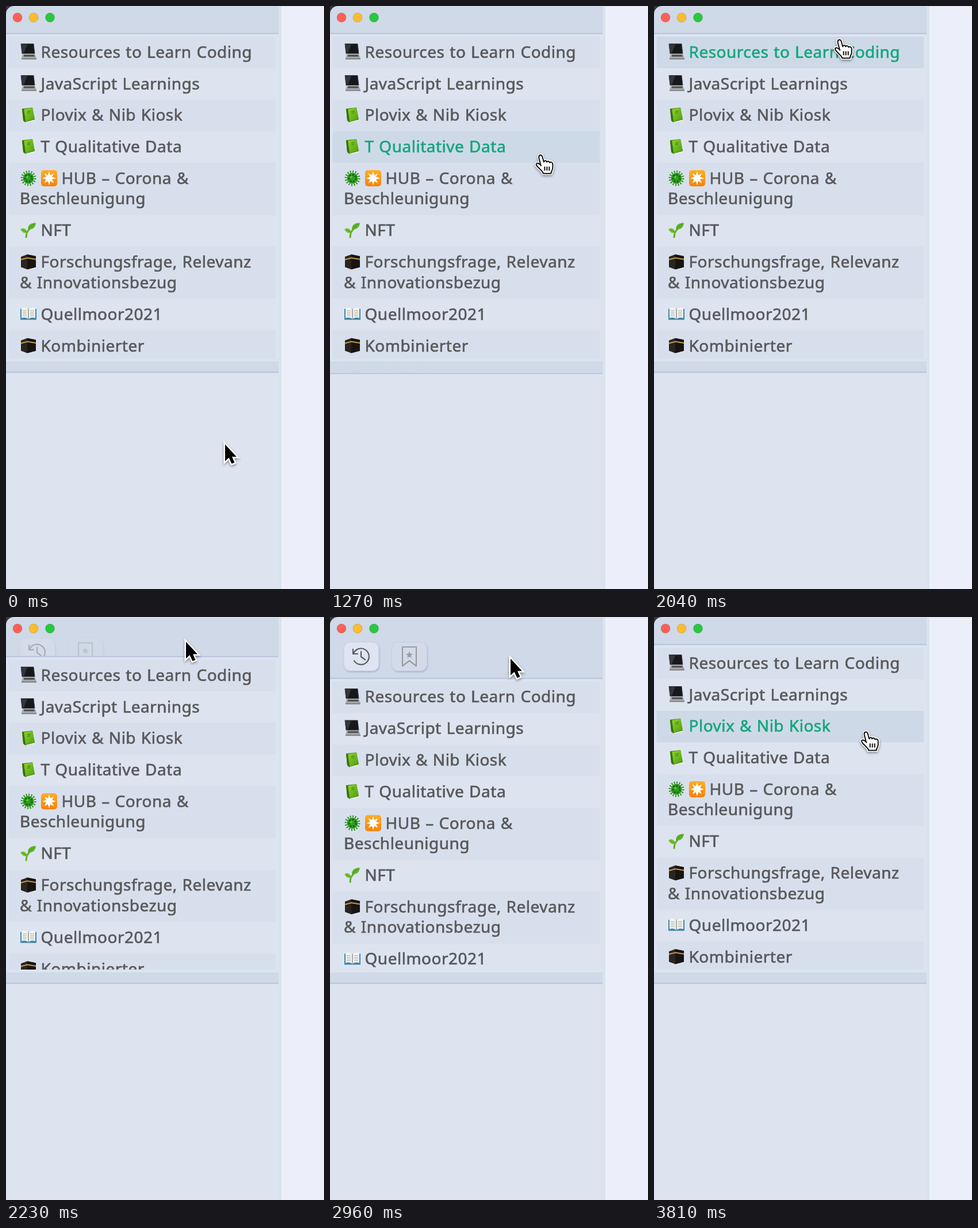
These frames come from a looping animation (553 px wide and 1012 px high, 3.85 s). An HTML page:

```html
<!DOCTYPE html>
<html lang="de">
<head>
<meta charset="utf-8">
<title>Sidebar</title>
<style>
  html, body { margin: 0; width: 100%; height: 100%; overflow: hidden; background: #dde4f0; }
  #stage { display: block; width: 100vw; height: 100vh; }
  text { font: 400 28px "Noto Sans", sans-serif; letter-spacing: .5px; word-spacing: 1px; fill: #59595b; stroke: #59595b; stroke-width: .7px; }
  .row rect { fill: transparent; }
  .row:nth-child(odd) rect { fill: #d8dfec; }
  .row.hover rect { fill: #ced9e7; }
  .row.hover text { fill: #15a67e; stroke: #15a67e; }
  .bar { fill: #cfd9e7; }
  .edge { fill: #bbc8e0; }
  .button { fill: #dee4f1; stroke: #c3cee5; filter: drop-shadow(1px 2px 1px #aab8d2); }
  .dim { fill: #d3dbe9; }
  .line { fill: none; stroke: #5d5d60; stroke-width: 2.2; stroke-linecap: round; stroke-linejoin: round; }
  .pale { stroke: #9a9ca3; }
  .light { stroke: #0002; }
  #cursor { filter: drop-shadow(0 2px 2px #0006); }
</style>
</head>
<body>
<svg id="stage" viewBox="0 0 553 1012" preserveAspectRatio="none">
  <defs>
    <clipPath id="listClip"><rect y="49" width="474" height="563"/></clipPath>
    <linearGradient id="orange" x2="0" y2="1"><stop stop-color="#ffad25"/><stop offset="1" stop-color="#f58208"/></linearGradient>
    <linearGradient id="green" x2="1" y2="1"><stop stop-color="#92d329"/><stop offset="1" stop-color="#4c9e14"/></linearGradient>

    <g id="laptop">
      <path d="M1 0H23L25 17H3Z" fill="#17181c" stroke="#45474b"/>
      <path d="M2 1H12L6 16H4Z" fill="#34363b"/>
      <path d="M4 18H25L28 25H2Z" fill="#a5a7a9"/>
      <path d="M6 19H24L25 22H6Z" fill="#4b4d50"/>
      <path d="M2 25H28V27H2Z" fill="#77797c"/>
    </g>
    <g id="book">
      <path d="M3 3L21 1L25 23L9 27L5 24Z" fill="#487d18"/>
      <path d="M9 26L25 22V24L10 27Z" fill="#f2f3e8"/>
      <path d="M6 4L21 1L25 21L9 25Z" fill="url(#green)"/>
      <path d="M3 3L6 4L9 25L5 23Z" fill="#34730d"/>
      <path d="M12 8L18 7M12 11L17 10" stroke="#4b9016" stroke-width="1.5"/>
    </g>
    <g id="microbe">
      <circle cx="14" cy="14" r="11.5" fill="none" stroke="#359527" stroke-width="4" stroke-dasharray="2 2.5"/>
      <circle cx="14" cy="14" r="9.5" fill="#2f9c22"/>
      <circle cx="14" cy="14" r="6" fill="none" stroke="#14690f" stroke-width="3" stroke-dasharray="3 2.4"/>
      <circle cx="12" cy="12" r="2" fill="#65c43b"/>
    </g>
    <g id="burst">
      <rect width="28" height="28" rx="5" fill="url(#orange)"/>
      <path id="burstStar" fill="#fff"/>
    </g>
    <g id="sprout">
      <path d="M10 27C10 19 12 15 17 11" fill="none" stroke="#62ad28" stroke-width="3"/>
      <path d="M13 12C13 3 20 1 27 1C26 9 22 13 13 12Z" fill="#5fb52b"/>
      <path d="M12 18C10 10 5 9 0 12C3 18 7 20 12 18Z" fill="#78c636"/>
      <path d="M14 11L24 3M3 13L11 17" stroke="#3b8c18"/>
    </g>
    <g id="cube">
      <path d="M1 5L12 1L27 4V23L12 27L1 23Z" fill="#2b2521"/>
      <path d="M12 1L27 4V23L12 27Z" fill="#181412"/>
      <path d="M1 10L12 7L27 9.500" fill="none" stroke="#c59a43" stroke-width="2"/>
    </g>
    <g id="pages">
      <path d="M0 5H28V24H0Z" fill="#3f86ad"/>
      <path d="M2 4C7 2 11 3 14 6C17 3 21 2 26 4V21C21 19 17 20 14 23C11 20 7 19 2 21Z" fill="#f4f4ee"/>
      <path d="M14 6V23" stroke="#8b928f" stroke-width="1.5"/>
      <path d="M4 8H11M4 11H11M4 14H11M4 17H11M17 8H24M17 11H24M17 14H24M17 17H24" stroke="#a5aaa8"/>
    </g>
  </defs>

  <rect width="553" height="1012" fill="#dde4f0"/>
  <rect x="474" width="5" height="1012" fill="#d9e3ee"/>
  <rect x="479" width="74" height="1012" fill="#eceff9"/>
  <rect y="611" width="474" height="6" fill="#d9e4ef"/>
  <g clip-path="url(#listClip)"><g id="list"></g></g>

  <svg id="topBar" width="474" height="49">
    <rect class="bar" width="100%" height="100%"/>
    <g class="buttons">
      <rect class="button" x="24" y="43.5" width="61" height="50" rx="11"/>
      <rect class="button dim" x="107.500" y="43.5" width="61" height="50" rx="11"/>
      <path class="line" d="M41 63A14 14 0 1 1 42 76M40 56V64H48M54 60V69L61 74"/>
      <path class="line pale" d="M126 52H150V85L138 76L126 85Z"/>
      <path id="markStar" fill="#9a9ca3"/>
    </g>
    <rect class="edge" y="100%" width="100%" height="2.5" transform="translate(0 -2.5)"/>
  </svg>

  <svg id="bottomBar" y="617" width="474" height="20">
    <rect class="bar" width="100%" height="100%"/>
    <g class="buttons">
      <rect class="button dim" x="24" y="15.5" width="61" height="50" rx="11"/>
      <rect class="button" x="107.500" y="15.5" width="61" height="50" rx="11"/>
      <g transform="translate(54 40.500) rotate(43)">
        <rect x="-20" y="-7" width="40" height="14" rx="7" fill="#999b9e"/>
        <path d="M-11 -5L-7 4M-3 -5L1 4M5 -5L9 4" stroke="#c6cbd4" stroke-width="2"/>
      </g>
      <path class="line" d="M128 30V53M148 30V53M128 41H148"/>
    </g>
    <rect class="edge" y="100%" width="100%" height="2.5" transform="translate(0 -2.5)"/>
  </svg>

  <path d="M0 0H14A14 14 0 0 0 0 14Z" fill="#34363a"/>
  <path d="M14 .5H553" stroke="#dce3ec"/>
  <circle class="light" cx="20" cy="20" r="8" fill="#fe5f57"/>
  <circle class="light" cx="48" cy="20" r="8" fill="#febc2e"/>
  <circle class="light" cx="76.500" cy="20" r="8" fill="#28c840"/>

  <g id="cursor">
    <path id="arrow" d="M0 0V29L6.500 23L11.500 33.500L16.500 31.500L12 21.500H20Z" stroke="#fff" stroke-width="5" paint-order="stroke"/>
    <g id="hand" transform="translate(-11.500 -3.500)">
      <path id="palm" d="M10 20L7 8C6 3 11 1 13 6L15.500 15C16.500 12 20 12 20.500 15C22 13 25 13 25.500 16C28 14.500 31 15.500 31 19V25C31 29 28.500 30 28 35H14.500C13.500 30 6 26 3 21C1 17.500 4 16 7 18Z" fill="#fff" stroke="#fff" stroke-width="5"/>
      <path d="M10 20L7 8C6 3 11 1 13 6L15.500 15C16.500 12 20 12 20.500 15C22 13 25 13 25.500 16C28 14.500 31 15.500 31 19V25C31 29 28.500 30 28 35H14.500C13.500 30 6 26 3 21C1 17.500 4 16 7 18ZM10 20L11 22M17 23V30M21 23V30M25 23V30" fill="none" stroke="#111" stroke-width="2" stroke-linejoin="round"/>
    </g>
  </g>
</svg>
<script>
const $ = id => document.getElementById(id);
const LOOP = 3850, SLIDE = 400, LIST_TOP = 53.2, LIST_END = 612;

const entries = [
  [["laptop"], ["Resources to Learn Coding"]],
  [["laptop"], ["JavaScript Learnings"]],
  [["book"], ["Plovix & Nib Kiosk"]],
  [["book"], ["T Qualitative Data"]],
  [["microbe", "burst"], ["HUB – Corona &", "Beschleunigung"]],
  [["sprout"], ["NFT"]],
  [["cube"], ["Forschungsfrage, Relevanz", "& Innovationsbezug"]],
  [["pages"], ["Quellmoor2021"]],
  [["cube"], ["Kombinierter"]]
];

// Cursor stops: time, x, y
const path = [
  [0, 381, 761], [450, 353, 638], [560, 349, 628], [850, 349, 628],
  [960, 350, 610], [1380, 371, 196], [1540, 371, 196], [1690, 381, 169],
  [2100, 318, 50], [2230, 313, 43], [2730, 313, 43], [2960, 314, 72],
  [3190, 325, 155], [3540, 368, 197], [3730, 368, 197], [LOOP, 371, 201]
];

function star(cx, cy, outer, inner, points) {
  const corners = Array.from({ length: points * 2 }, (_, i) => {
    const angle = i * Math.PI / points - Math.PI / 2, r = i % 2 ? inner : outer;
    return `${cx + r * Math.cos(angle)} ${cy + r * Math.sin(angle)}`;
  });
  return `M${corners.join("L")}Z`;
}

function buildList() {
  let top = LIST_TOP;
  return entries.map(([icons, lines]) => {
    const height = lines.length > 1 ? 90.5 : 54.8;
    const row = document.createElementNS("http://www.w3.org/2000/svg", "g");
    row.setAttribute("class", "row");
    row.innerHTML = `<rect x="4.5" y="${top}" width="465" height="${height}"/>` +
      icons.map((icon, i) => `<use href="#${icon}" x="${25 + 36 * i}" y="${top + 12.5}"/>`).join("") +
      lines.map((line, i) => `<text x="${i ? 24 : 24.5 + 36 * icons.length}" y="${top + 36.5 + 35.5 * i}">${line.replace("&", "&amp;")}</text>`).join("");
    $("list").append(row);
    const bounds = { row, top, bottom: top + height };
    top += height;
    return bounds;
  });
}

// cubic-bezier(.25, .1, .25, 1)
function ease(x) {
  if (x <= 0) return 0;
  if (x >= 1) return 1;
  const curve = (s, a, b) => 3 * s * (1 - s) ** 2 * a + 3 * s * s * (1 - s) * b + s ** 3;
  let low = 0, high = 1;
  for (let i = 0; i < 20; i++) {
    const mid = (low + high) / 2;
    if (curve(mid, .25, .25) < x) low = mid; else high = mid;
  }
  return curve(low, .1, 1);
}

const opening = (t, from, until) => ease((t - from) / SLIDE) - ease((t - until) / SLIDE);

// Monotone cubic interpolation keeps rests still and avoids overshoot.
function along(t, axis) {
  const slope = i => path[i] && path[i + 1]
    ? (path[i + 1][axis] - path[i][axis]) / (path[i + 1][0] - path[i][0]) : 0;
  const tangent = i => {
    const a = slope(i - 1), b = slope(i);
    return a * b > 0 ? 2 * a * b / (a + b) : 0;
  };
  const i = Math.max(0, path.findIndex(p => p[0] > t) - 1);
  const span = path[i + 1][0] - path[i][0], u = (t - path[i][0]) / span;
  return path[i][axis] * (1 + 2 * u) * (1 - u) ** 2 + path[i + 1][axis] * u * u * (3 - 2 * u) +
    span * u * (1 - u) * (tangent(i) * (1 - u) - tangent(i + 1) * u);
}

function setBar(bar, height, amount) {
  bar.setAttribute("height", height);
  const buttons = bar.querySelector(".buttons");
  buttons.setAttribute("opacity", amount);
  buttons.setAttribute("transform", `translate(0 ${-11 * (1 - amount)})`);
}

$("burstStar").setAttribute("d", star(14, 14, 12, 5.5, 8));
$("markStar").setAttribute("d", star(138, 66, 6.5, 2.8, 5));
const rows = buildList();

function draw(now) {
  const t = now % LOOP, x = along(t, 1), y = along(t, 2);
  const top = opening(t, 2140, 3038), bottom = opening(t, 440, 970);
  const shift = 58.8 * top;

  setBar($("topBar"), 49 + shift, top);
  setBar($("bottomBar"), 20 + 60 * bottom, bottom);
  $("list").setAttribute("transform", `translate(0 ${shift})`);

  let overRow = false;
  for (const { row, top, bottom } of rows) {
    const hover = y < LIST_END && y >= top + shift && y < bottom + shift;
    row.classList.toggle("hover", hover);
    overRow ||= hover;
  }
  $("cursor").setAttribute("transform", `translate(${x} ${y})`);
  $("arrow").style.display = overRow ? "none" : "";
  $("hand").style.display = overRow ? "" : "none";
  requestAnimationFrame(() => draw(performance.now() - start));
}

const start = performance.now();
draw(0);
</script>
</body>
</html>
```
